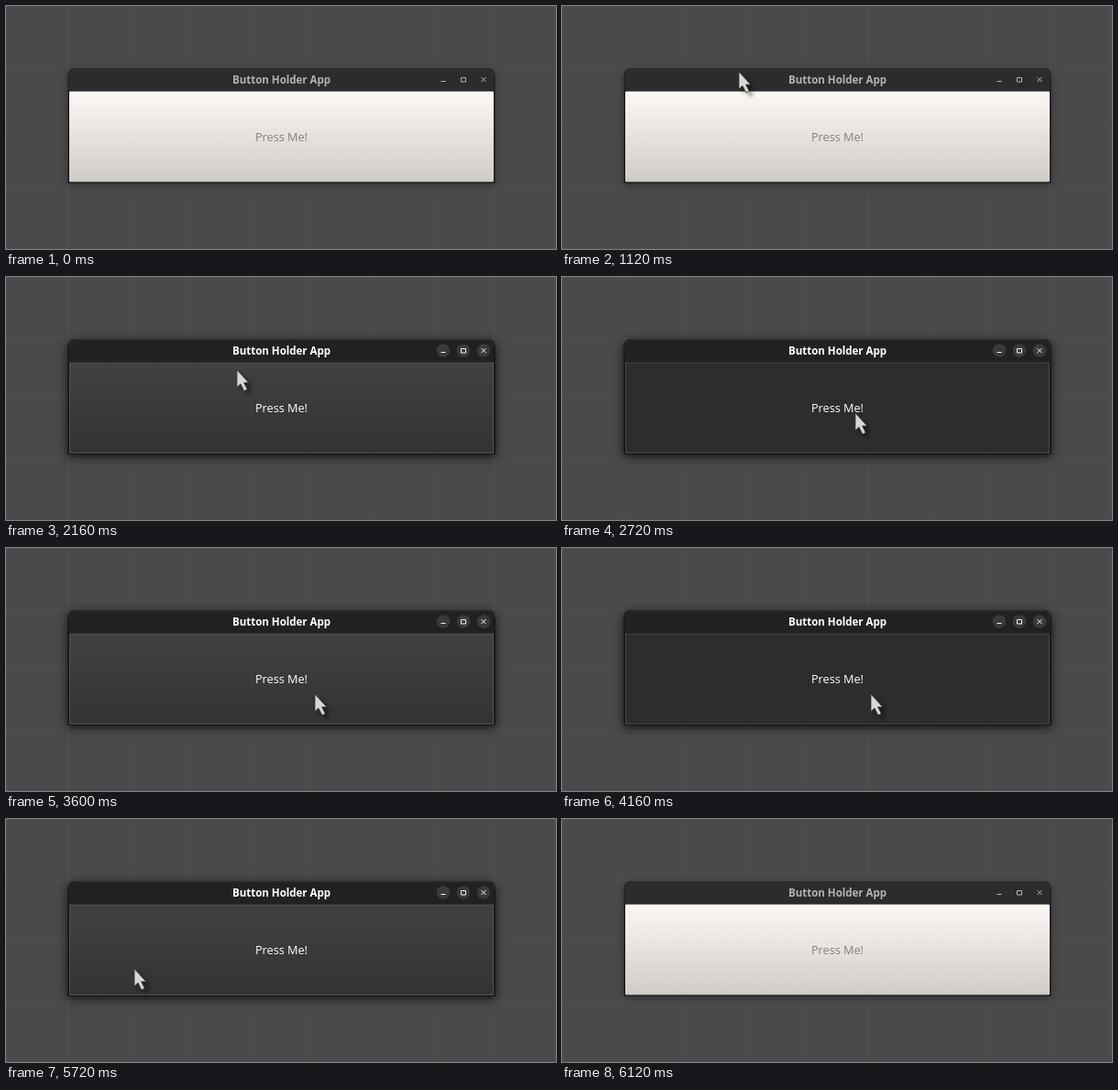
Animation, 600 px wide and 266 px high, one loop 6320 ms. Source, as an HTML page:

```html
<!DOCTYPE html>
<html lang="en">
<head>
<meta charset="utf-8">
<title>Button window</title>
<style>
html, body { margin: 0; width: 100%; height: 100%; overflow: hidden; background: #4b494b; }
svg { display: block; }
text { font-family: "Open Sans", "Noto Sans", sans-serif; text-anchor: middle; }
.title { font-size: 11.5px; font-weight: 700; }
.label { font-size: 12.7px; }
.blurred { filter: drop-shadow(0 2px 4px rgba(0,0,0,.35)); }
.focused { filter: drop-shadow(0 3px 6px rgba(0,0,0,.5)); }
.pointer { filter: drop-shadow(4px 4px 2px rgba(0,0,0,.4)); }
</style>
</head>
<body>
<svg width="600" height="266" viewBox="0 0 600 266">
  <defs>
    <linearGradient id="light" x2="0" y2="1">
      <stop stop-color="#fdf8f4"/><stop offset="1" stop-color="#cfcbc7"/>
    </linearGradient>
    <linearGradient id="dark" x2="0" y2="1">
      <stop stop-color="#424042"/><stop offset="1" stop-color="#343234"/>
    </linearGradient>
    <path id="frame" d="M67.5 194V76a8 8 0 0 1 8-8h450a8 8 0 0 1 8 8v118z"/>
    <path id="rim" d="M69 76a7 7 0 0 1 7-7.2h449a7 7 0 0 1 7 7.2" fill="none"/>
    <path id="icons" d="M474.5 82.5h5M496.5 78.5h5v4.5h-5zM518.5 78l5 5m0-5l-5 5" fill="none"/>
  </defs>
  <path id="grid" stroke="#535153" fill="none"/>

  <g>
    <use href="#frame" fill="#1b1a1b" class="blurred"/>
    <path d="M68.5 93V76a7 7 0 0 1 7-7h450a7 7 0 0 1 7 7v17z" fill="#2d2b2d"/>
    <use href="#rim" stroke="#383638"/>
    <rect x="69" y="93.5" width="463" height="99" rx="1" fill="url(#light)"/>
    <text class="title" x="300.5" y="85" fill="#b5b2b0">Button Holder App</text>
    <text class="label" x="300.5" y="148" fill="#86817d">Press Me!</text>
    <use href="#icons" stroke="#b5b2b0"/>
  </g>

  <g id="active">
    <use href="#frame" fill="#171617" class="focused"/>
    <path d="M68.5 93V76a7 7 0 0 1 7-7h450a7 7 0 0 1 7 7v17z" fill="#222022"/>
    <use href="#rim" stroke="#343234"/>
    <rect id="button" x="69.5" y="94" width="462" height="98.5" stroke="#555355"/>
    <text class="title" x="300.5" y="85" fill="#fff">Button Holder App</text>
    <text class="label" x="300.5" y="148" fill="#fff">Press Me!</text>
    <g fill="#3b393b">
      <circle cx="477" cy="80.5" r="7.3"/><circle cx="499" cy="80.5" r="7.3"/><circle cx="521" cy="80.5" r="7.3"/>
    </g>
    <use href="#icons" stroke="#f4f2f1"/>
  </g>

  <g id="pointer" class="pointer" fill="#d9d7d6" stroke="#383638" stroke-width=".8">
    <path id="arrow" d="M0 0V19L4 15.3 7.8 23 11.3 21.4 7.6 14H12.8z"/>
    <path id="move" d="M0-9.5L4-5H1.3V-1.3H5V-4L9.5 0 5 4V1.3H1.3V5H4L0 9.5-4 5H-1.3V1.3H-5V4L-9.5 0-5-4V-1.3H-1.3V-5H-4z"/>
  </g>
</svg>
<script>
const LOOP = 6320, STEP = 40;
const $ = id => document.getElementById(id);
const set = (id, name, value) => $(id).setAttribute(name, value);

// time, x, y of the pointer tip
const path = [
  [720, 116, -26], [960, 174, 58], [1120, 193, 72], [1320, 198, 73],
  [1600, 198, 73], [2000, 215, 76], [2400, 320, 149], [3240, 320, 149],
  [3400, 334, 202], [3600, 337, 160], [4200, 337, 160], [4400, 364, 78],
  [4600, 385, 158], [4700, 381, 158], [5040, 140, 164]
];
const presses = [[2720, 2880], [3040, 3240], [3720, 3880], [4080, 4240]];
const between = (t, [a, b]) => t >= a && t < b;

function position(t) {
  const i = path.findIndex(k => k[0] > t);
  if (i < 1) return (i ? path[path.length - 1] : path[0]).slice(1);
  const [t0, x0, y0] = path[i - 1], [t1, x1, y1] = path[i];
  const u = (t - t0) / (t1 - t0), e = u * u * (3 - 2 * u);
  return [x0 + (x1 - x0) * e, y0 + (y1 - y0) * e];
}

function draw(now) {
  const t = Math.floor(now % LOOP / STEP) * STEP;
  const fade = Math.min(1, Math.max(0, (6120 - t) / 400));
  const pressed = presses.some(p => between(t, p));
  const moving = between(t, [1400, 1600]);
  set("active", "opacity", t < 1400 ? 0 : fade);
  set("button", "fill", pressed ? "#2e2c2e" : "url(#dark)");
  set("button", "stroke", pressed ? "#484648" : "#555355");
  set("pointer", "transform", `translate(${position(t)})`);
  set("pointer", "opacity", t < 720 ? 0 : fade);
  set("arrow", "visibility", moving ? "hidden" : "visible");
  set("move", "visibility", moving ? "visible" : "hidden");
}

let lines = "";
for (let i = 0; i < 10; i++) lines += `M${1 + 66.45 * i} 0v266M0 ${.5 + 66.4 * i}h600`;
set("grid", "d", lines);

const start = performance.now();
function tick() {
  draw(performance.now() - start);
  requestAnimationFrame(tick);
}
tick();
</script>
</body>
</html>
```
